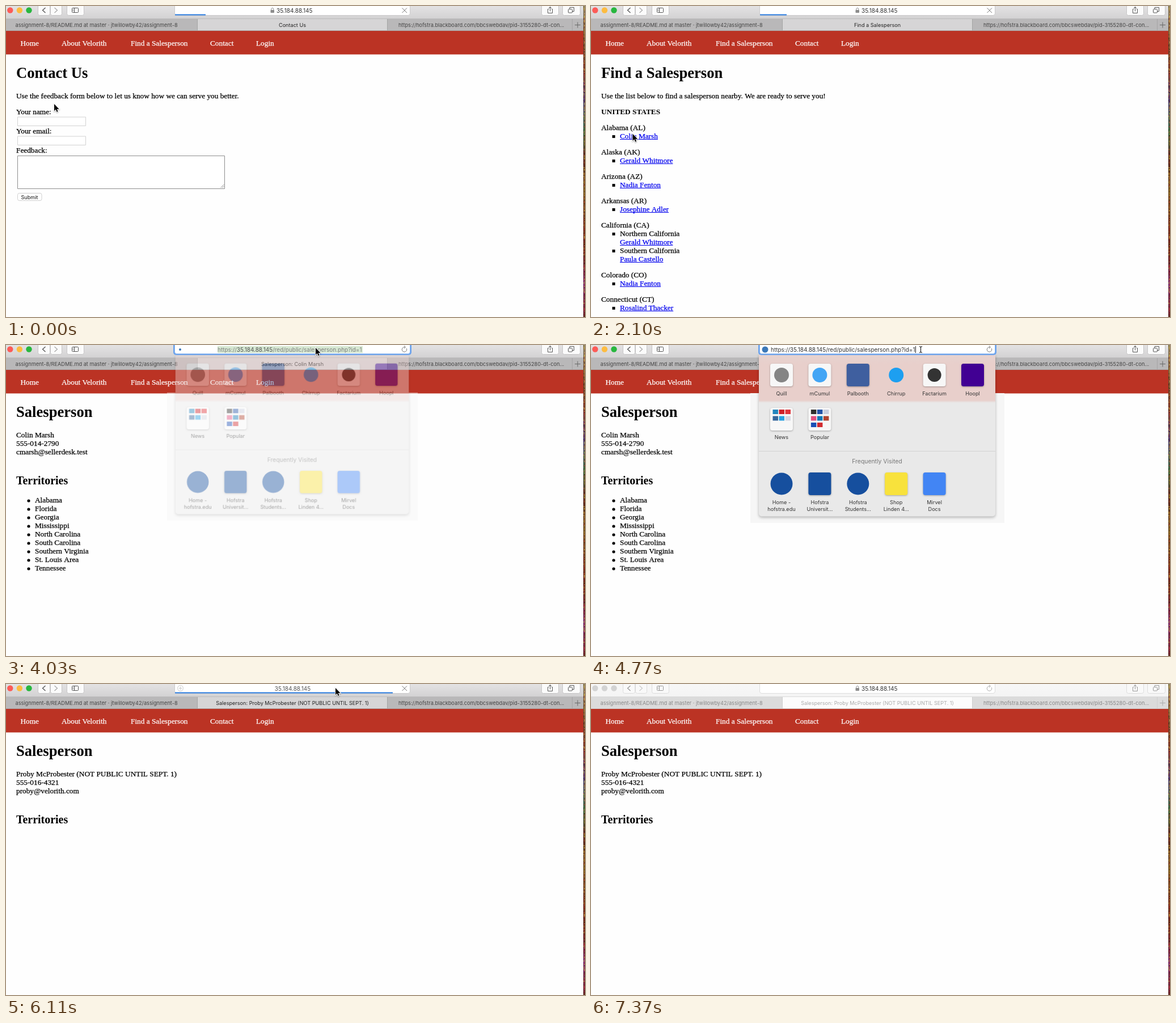
An HTML page with a canvas that plays this animation: 1021 px wide and 549 px high, repeating every 7470 ms.

```html
<!DOCTYPE html>
<html lang="en">
<head>
<meta charset="utf-8">
<title>Contact Us</title>
<style>
html, body { margin: 0; width: 100%; height: 100%; overflow: hidden; background: #fff; }
canvas { display: block; }
</style>
</head>
<body>
<canvas id="stage" width="1021" height="549"></canvas>
<script>
const W = 1021, H = 549, LOOP = 7470;
const SERIF = '"Liberation Serif", Times, serif';
const SANS = 'Inter, "Liberation Sans", sans-serif';
const stage = document.getElementById('stage').getContext('2d');
let c = stage;

// Runs of evenly spaced updates: first time, last time, count
const ticks = [[0, 0, 1], [150, 1070, 7], [1220, 2250, 8], [2400, 3430, 8], [3580, 3730, 2],
  [4030, 4770, 6], [5520, 5520, 1], [5820, 6110, 3], [6280, 6730, 4], [6880, 6880, 1], [7370, 7370, 1]]
  .flatMap(([a, b, n]) => Array.from({ length: n }, (_, i) =>
    Math.round((a + (n > 1 ? (b - a) * i / (n - 1) : 0)) / 10) * 10));

const pointer = [[0, 85, 173], [760, 296, 66], [1220, 296, 64], [1960, 74, 226], [2400, 72, 225],
  [3140, 450, 42], [3430, 500, 18], [3730, 532, 8], [4030, 546, 5], [4330, 581, 7],
  [6110, 581, 7], [6730, 1008, 526]];

const progress = [[0, 352], [460, 712], [461, 0], [1219, 0], [1220, 347], [1660, 706], [1661, 0],
  [2099, 0], [2100, 345], [2400, 706], [2401, 0], [5819, 0], [5820, 346], [6110, 682], [6280, 712], [6281, 0]];

const smooth = u => u * u * (3 - 2 * u);

function sample(keys, t, ease = u => u) {
  const i = keys.findIndex(k => k[0] > t);
  if (i < 0) return keys[keys.length - 1].slice(1);
  const a = keys[i - 1], b = keys[i];
  const u = ease((t - a[0]) / (b[0] - a[0]));
  return a.slice(1).map((v, j) => v + (b[j + 1] - v) * u);
}

// Drawing helpers
function rect(x, y, w, h, fill) {
  c.fillStyle = fill;
  c.fillRect(x, y, w, h);
}

function round(x, y, w, h, r, fill, line) {
  c.beginPath();
  c.roundRect(x, y, w, h, r);
  if (fill) { c.fillStyle = fill; c.fill(); }
  if (line) { c.strokeStyle = line; c.lineWidth = 1; c.stroke(); }
}

function dot(x, y, r, fill) {
  c.beginPath();
  c.arc(x, y, r, 0, 7);
  c.fillStyle = fill;
  c.fill();
}

function path(points, color, width = 1) {
  c.beginPath();
  points.forEach(([x, y], i) => i ? c.lineTo(x, y) : c.moveTo(x, y));
  c.strokeStyle = color;
  c.lineWidth = width;
  c.stroke();
}

function text(s, x, y, size, color = '#000', family = SERIF, align = 'left', weight = '') {
  c.font = `${weight} ${size}px ${family}`;
  c.fillStyle = color;
  c.textAlign = align;
  c.fillText(s, x, y);
}

// Page text is a little heavier than the plain glyphs
function prose(s, x, y, color = '#000') {
  text(s, x, y, 13.3, color);
  c.strokeStyle = color;
  c.lineWidth = 0.25;
  c.strokeText(s, x, y);
}

const body = (s, y, x = 18) => prose(s, x, y);
const ui = (s, x, y, color, size = 9.14, align = 'center') => text(s, x, y, size, color, SANS, align);
const heading = (s, y, size) => text(s, 18, y, size, '#000', SERIF, 'left', 'bold');

function link(s, y) {
  prose(s, 51, y, '#00e');
  rect(51, y + 1, c.measureText(s).width, 1, '#00e');
}

// Pages
function contactPage() {
  heading('Contact Us', 127, 26.6);
  body('Use the feedback form below to let us know how we can serve you better.', 163);
  body('Your name:', 191);
  body('Your email:', 225);
  body('Feedback:', 259);
  round(20.5, 196, 120, 15.5, 0, '#fff', '#d2d2d2');
  round(20.5, 230, 120, 15.5, 0, '#fff', '#d2d2d2');
  round(20.5, 264.5, 365, 58, 0, '#fff', '#8e8e8e');
  path([[378.5, 321], [384.5, 315]], '#777', 0.8);
  path([[381.5, 321], [384.5, 318]], '#777', 0.8);
  round(20.5, 330.5, 42.5, 13, 3, '#fff', '#cfcfcf');
  ui('Submit', 41.5, 340.5, '#111');
}

const states = [
  ['Alabama (AL)', 'Colin Marsh'], ['Alaska (AK)', 'Gerald Whitmore'], ['Arizona (AZ)', 'Nadia Fenton'],
  ['Arkansas (AR)', 'Josephine Adler'],
  ['California (CA)', '*Northern California', 'Gerald Whitmore', '*Southern California', 'Paula Castello'],
  ['Colorado (CO)', 'Nadia Fenton'], ['Connecticut (CT)', 'Rosalind Thacker']];

function listPage() {
  heading('Find a Salesperson', 127, 26.6);
  body('Use the list below to find a salesperson nearby. We are ready to serve you!', 163);
  heading('UNITED STATES', 191, 13.3);
  let y = 219;
  for (const [state, ...rows] of states) {
    body(state, y);
    rows.forEach((row, i) => {
      y += 15;
      const area = row[0] === '*';
      if (area) body(row.slice(1), y, 51); else link(row, y);
      if (area || !i) rect(37.5, y - 6, 5, 5, '#000');
    });
    y += 28;
  }
}

function personPage(lines, areas) {
  heading('Salesperson', 127, 26.6);
  lines.forEach((s, i) => body(s, 163 + i * 15));
  heading('Territories', 246, 19.95);
  areas.forEach((s, i) => {
    dot(40, 275 + i * 15, 2.6, '#000');
    body(s, 278 + i * 15, 51);
  });
}

const hidden = 'Proby McProbester (NOT PUBLIC UNTIL SEPT. 1)';
const areas = ['Alabama', 'Florida', 'Georgia', 'Mississippi', 'North Carolina', 'South Carolina',
  'Southern Virginia', 'St. Louis Area', 'Tennessee'];

function page(t) {
  rect(0, 44, 1018, 505, '#fefefe');
  rect(0, 44, 1018, 41.5, '#bb3324');
  [['Home', 25.5], ['About Velorith', 98], ['Find a Salesperson', 220], ['Contact', 360], ['Login', 441]]
    .forEach(([s, x]) => prose(s, x, 70, '#fff'));
  if (t < 1220) contactPage();
  else if (t < 2250) listPage();
  else if (t < 5970) personPage(['Colin Marsh', '555-014-2790', 'cmarsh@sellerdesk.test'], areas);
  else personPage([hidden, '555-016-4321', 'proby@velorith.com'], []);
}

// Browser window
function toolbar(idle) {
  const g = c.createLinearGradient(0, 0, 0, 22);
  g.addColorStop(0, idle ? '#f7f7f7' : '#e3e2e3');
  g.addColorStop(1, idle ? '#f4f4f4' : '#d3d2d3');
  rect(0, 0, 1018, 23, g);
  ['#fc5b57', '#fdbc40', '#28b73f'].forEach((k, i) => dot(7.3 + i * 16.6, 7.5, 5.2, idle ? '#d3d3d3' : k));
  const edge = idle ? '#dcdcdc' : '#c6c5c6', ink = idle ? '#999' : '#555';
  [[56, 21], [78, 20], [107, 30], [944, 30], [981, 31]]
    .forEach(([x, w]) => round(x + 0.5, -4.5, w, 21, 3, idle ? '#f9f9f9' : '#fbfbfb', edge));
  path([[69.5, 3], [64.5, 7.5], [69.5, 12]], ink, 1.3);
  path([[85.5, 3], [90.5, 7.5], [85.5, 12]], idle ? '#ccc' : '#aaa', 1.3);
  round(116.5, 3.5, 11, 8, 1, null, ink);
  path([[120.5, 3.5], [120.5, 11.5]], ink);
  path([[117.5, 6], [119.5, 6]], ink, 0.7);
  path([[117.5, 8.5], [119.5, 8.5]], ink, 0.7);
  path([[957, 5.5], [955.5, 5.5], [955.5, 12.5], [963.5, 12.5], [963.5, 5.5], [962, 5.5]], ink);
  path([[959.5, 9.5], [959.5, 1.5]], ink);
  path([[957, 4], [959.5, 1.5], [962, 4]], ink);
  round(991.5, 5.5, 7, 6.5, 1, null, ink);
  path([[994, 5], [994, 2.5], [1001.5, 2.5], [1001.5, 9.5], [999, 9.5]], ink);
}

function tabs(t, idle) {
  rect(0, 23, 1018, 21, idle ? '#dbdbdb' : '#b9b8b9');
  rect(338, 23, 335, 21, idle ? '#fcfcfc' : '#d6d5d6');
  rect(0, 22, 1018, 1, idle ? '#dadada' : '#bdbcbd');
  rect(0, 43, 1018, 1, idle ? '#ccc' : '#a8a3a3');
  [337, 672, 998].forEach(x => rect(x, 23, 1, 20, idle ? '#d0d0d0' : '#a5a5a5'));
  const ink = idle ? '#888' : '#444';
  ui('assignment-8/README.md at master · jtwillowby42/assignment-8', 16.5, 36.5, ink, 9.2, 'left');
  ui('https://hofstra.blackboard.com/bbcswebdav/pid-3155280-dt-con...', 692, 36.5, ink, 9.2, 'left');
  const title = t < 1370 ? 'Contact Us' : t < 2400 ? 'Find a Salesperson'
    : t < 5970 ? 'Salesperson: Colin Marsh' : 'Salesperson: ' + hidden;
  ui(title, 505, 36.5, idle ? '#aaa' : '#222');
  path([[1003, 33.5], [1013, 33.5]], idle ? '#aaa' : '#666');
  path([[1008, 28.5], [1008, 38.5]], idle ? '#aaa' : '#666');
}

function reloadIcon(color) {
  c.beginPath();
  c.arc(702.5, 8, 4.2, -0.5, 4.9);
  c.strokeStyle = color;
  c.lineWidth = 1;
  c.stroke();
  path([[702, 1.5], [704.5, 3.8], [702, 6]], color);
}

// Writes the parts of the address one after another and returns the end
function url(x, parts) {
  for (const [s, color] of parts) {
    ui(s, x, 11.5, color, 9.97, 'left');
    x += c.measureText(s).width;
  }
  return x;
}

const HOST = '35.184.88.145', QUERY = '/red/public/salesperson.php?id=1';

function address(t, idle) {
  const focus = t >= 4030 && t < 5820;
  const [bar] = sample(progress, t);
  if (focus) round(295, -6, 420, 23.7, 5, '#69a1ec');
  round(297.5, -4.5, 415, focus ? 20 : 21, 3.5, '#fff', focus ? '#8fb9f0' : idle ? '#ddd' : '#cbcacb');
  if (focus && t < 4180) {
    rect(373, 2, 256, 12, '#d6e8d2');
    dot(307, 8, 2, '#3c78b8');
    url(373, [['https://', '#808080'], [HOST, '#555'], [QUERY, '#808080']]);
  } else if (focus) {
    dot(307, 8, 5.5, '#3c78b8');
    const end = url(317, [['https://' + HOST + QUERY + (t < 5520 ? '' : '0'), '#333']]);
    rect(end + 0.5, 2, 1, 12, '#222');
  } else if (t >= 5820 && bar) {
    ui(HOST, 505.5, 11.5, '#555', 9.97);
    c.beginPath();
    c.arc(307.5, 7.5, 5, 0, 7);
    c.strokeStyle = '#ccc';
    c.lineWidth = 1;
    c.stroke();
    path([[304.5, 7.5], [310.5, 7.5]], '#ccc');
    path([[307.5, 4.5], [307.5, 10.5]], '#ccc');
  } else {
    round(466.5, 7, 6.5, 5, 0.8, '#8c8c8c');
    round(467.8, 3.5, 4, 6, 2, null, '#8c8c8c');
    url(477, [[HOST, '#333']]);
  }
  if (bar) {
    rect(298, 14.5, bar - 298, 2, '#2b7de0');
    path([[698.5, 3.5], [707, 12]], '#777');
    path([[707, 3.5], [698.5, 12]], '#777');
  } else reloadIcon(idle ? '#aaa' : '#777');
}

// Favorites panel, drawn once and then faded and scaled
const column = i => 336 + i * 67.4;

function tile(i, y, fill) {
  c.shadowColor = 'rgba(0,0,0,.3)';
  c.shadowBlur = 3;
  c.shadowOffsetY = 1;
  round(column(i) - 20, y - 20, 40, 40, 4, fill);
  c.shadowColor = 'transparent';
}

function minis(i, colors) {
  tile(i, 131, '#f7f7f7');
  colors.forEach((k, n) => rect(column(i) - 15.5 + n % 3 * 11, 114 + Math.floor(n / 3) * 11.5, 9.5, 8, k));
}

function makePanel() {
  const layer = document.createElement('canvas');
  layer.width = W;
  layer.height = 330;
  c = layer.getContext('2d');
  rect(281, 85, 448, 229, '#f6f6f6');
  c.shadowColor = 'rgba(0,0,0,.28)';
  c.shadowBlur = 5;
  c.shadowOffsetY = 2;
  round(296, 17, 417, 285.5, [0, 0, 5, 5], '#e9e9e9');
  c.shadowColor = 'transparent';
  const g = c.createLinearGradient(0, 17, 0, 102);
  g.addColorStop(0, '#e6d3d0');
  g.addColorStop(0.2, '#e8cfcb');
  g.addColorStop(0.95, '#e8cfcb');
  g.addColorStop(1, '#e9e9e9');
  rect(296, 17, 417, 85, g);
  rect(296, 187, 417, 1, '#d2d2d2');

  const row = (labels, y) => labels.forEach((s, i) => ui(s, column(i), y, '#333'));
  row(['Quill', 'mCumul', 'Palbooth', 'Chirrup', 'Factarium', 'Hoopl'], 88.5);
  row(['News', 'Popular'], 165.5);
  ui('Frequently Visited', 504.5, 209, '#777', 10.4);
  row(['Home -', 'Hofstra', 'Hofstra', 'Shop', 'Mirvel'], 280.5);
  row(['hofstra.edu', 'Universit...', 'Students...', 'Linden 4...', 'Docs'], 292.5);

  ['#f7f7f7', '#f7f7f7', '#3f5f9f', null, '#f7f7f7', '#410093'].forEach((k, i) => k && tile(i, 53, k));
  dot(column(0), 53, 13, '#858585');
  dot(column(1), 53, 13, '#43a5f5');
  dot(column(3), 53, 13, '#1d9ff0');
  dot(column(4), 53, 12, '#333');
  minis(0, ['#2386bd', '#cf2027', '#e0343a', '#36679b', '#27a0e0', '#d5d7e2']);
  minis(1, ['#30302e', '#2453a8', '#c9cede', '#e4507f', '#1178b5', '#b2432f', '#1c50b5', '#d22b30']);
  [0, 2].forEach(i => dot(column(i), 245, 19.5, '#164f9e'));
  tile(1, 245, '#164f9e');
  tile(3, 245, '#f8e23c');
  tile(4, 245, '#4285f4');
  c = stage;
  return layer;
}

function favorites(t) {
  if (t < 4030 || t >= 5520) return;
  const [alpha, scale] = sample([[4030, 0.43, 0.987], [4180, 0.9, 0.998], [4330, 1, 1]], t);
  c.save();
  c.globalAlpha = alpha;
  c.translate(504.5, 0);
  c.scale(scale, scale);
  c.drawImage(panel, -504.5, 0);
  c.restore();
}

// Sliver of colourful desktop beside the window
function desktop() {
  const g = c.createLinearGradient(0, 0, 0, H);
  ['#a59a75', '#8a6a40', '#8c3428', '#50408a', '#3d7a48', '#6a2a20', '#8c6a2a', '#83301f',
    '#7a2420', '#8a2a80', '#7a2030'].forEach((k, i, all) => g.addColorStop(i / (all.length - 1), k));
  rect(1018, 0, 3, H, g);
  let seed = 7;
  const rnd = () => (seed = seed * 16807 % 2147483647) / 2147483647;
  for (let y = 0; y < H; y += 2) {
    rect(1018 + Math.floor(rnd() * 3), y, 2, 2, `hsla(${rnd() * 60},70%,${10 + rnd() * 50}%,.5)`);
  }
  rect(1018, 0, 1, H, 'rgba(40,20,20,.35)');
}

function cursor(t) {
  if (t >= 6880) return;
  const [x, y] = sample(pointer, t, smooth);
  if (t >= 4330 && t < 5820) {
    const beam = [[[579, 2.5], [581.5, 3.5], [584, 2.5]], [[581.5, 3], [581.5, 13]], [[579, 13.5], [581.5, 12.5], [584, 13.5]]];
    beam.forEach(p => path(p, '#fff', 2.4));
    beam.forEach(p => path(p, '#111', 1.1));
    return;
  }
  c.save();
  c.translate(x, y);
  c.beginPath();
  [[0, 0], [0, 12.2], [2.8, 9.6], [4.7, 14], [6.6, 13.2], [4.8, 8.9], [8.6, 8.9]].forEach(p => c.lineTo(...p));
  c.closePath();
  c.shadowColor = 'rgba(0,0,0,.35)';
  c.shadowBlur = 2;
  c.shadowOffsetY = 1;
  c.lineWidth = 1.8;
  c.strokeStyle = '#fff';
  c.stroke();
  c.shadowColor = 'transparent';
  c.fillStyle = '#000';
  c.fill();
  c.restore();
}

const panel = makePanel();

function draw(t) {
  const idle = t >= 7370;
  page(t);
  toolbar(idle);
  tabs(t, idle);
  desktop();
  favorites(t);
  address(t, idle);
  cursor(t);
}

const start = performance.now();
let shown = -1;

function loop(now) {
  const t = Math.max(0, now - start) % LOOP;
  const tick = ticks.filter(k => k <= t).pop();
  if (tick !== shown) draw(shown = tick);
  requestAnimationFrame(loop);
}

draw(shown = 0);
requestAnimationFrame(loop);
</script>
</body>
</html>
```
